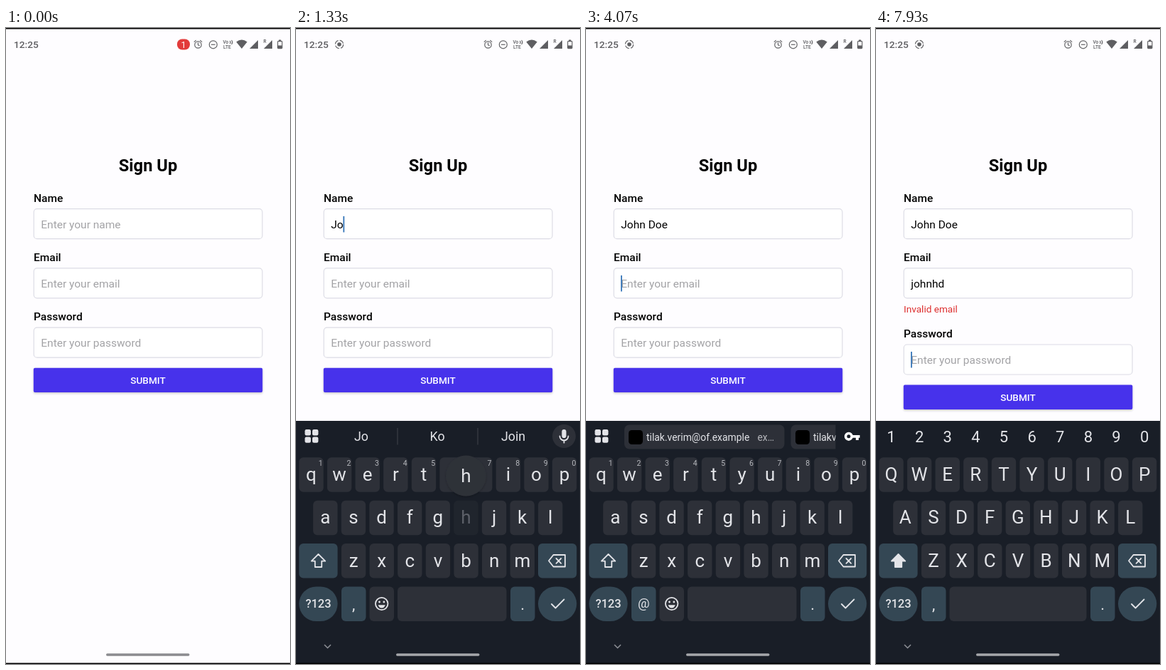
An HTML page for the animation above (8000 ms loop, 400x892 px).

```html
<!DOCTYPE html>
<html lang="en">
<head>
<meta charset="utf-8">
<title>Sign up form</title>
<style>
html, body { margin: 0; width: 100%; height: 100%; overflow: hidden; background: #fefdff; }
svg { display: block; width: 100vw; height: 100vh; font-family: Roboto, "Open Sans", sans-serif; }
text { white-space: pre; }
.mid { text-anchor: middle; }
.title { font-size: 23.7px; font-weight: 700; }
.label { font-size: 15.5px; font-weight: 500; }
.value { font-size: 15.5px; }
.hint { fill: #a3a3a6; }
.box { fill: #fff; stroke: #dcdce5; stroke-width: 1.2; }
.key { fill: #2d3038; }
.special { fill: #344754; }
.letter { font-size: 26px; fill: #e3e4e8; text-anchor: middle; }
.sup { font-size: 10.5px; fill: #b6b8bd; text-anchor: middle; }
.word { font-size: 17.8px; fill: #e3e4e8; text-anchor: middle; }
.chip { font-size: 13.9px; fill: #e3e4e8; }
.line { fill: none; stroke: #e3e4e8; stroke-width: 1.8; stroke-linecap: round; stroke-linejoin: round; }
.light { fill: #e3e4e8; }
.thin { fill: none; stroke: #626265; stroke-width: 1.2; }
.tiny { font-size: 6.6px; font-weight: 500; }
.held rect { fill: #20252d; }
.held .letter { fill: #5c6068; }
.pressed { fill: #454952; }
.off { display: none; }

#badge { transform-origin: 250px 23px; animation: badge 8s infinite; }
#rec { transform-origin: 61px 23px; animation: rec 8s infinite; }
#kb { animation: rise 8s infinite; }
#chevron { animation: chevron 8s infinite; }
#handle { animation: handle 8s infinite; }
@keyframes badge {
  0%, .87% { transform: scale(1); opacity: 1; }
  3.6%, 100% { transform: scale(0); opacity: 0; }
}
@keyframes rec {
  0%, 2.5% { transform: scale(.4); opacity: 0; }
  5%, 100% { transform: none; opacity: 1; }
}
@keyframes rise {
  0%, 4% { transform: translateY(341px); animation-timing-function: cubic-bezier(0, 0, .2, 1); }
  7.53%, 100% { transform: none; }
}
@keyframes chevron {
  0%, 5% { opacity: 0; }
  7%, 100% { opacity: 1; }
}
@keyframes handle {
  0%, 4% { fill: #8b8b8f; }
  4.6%, 7% { fill: #3a3e46; }
  10.5%, 100% { fill: #a5a7ab; }
}
</style>
</head>
<body>
<svg viewBox="0 0 400 892">
  <defs>
    <filter id="drop" x="-10%" y="-30%" width="120%" height="180%">
      <feDropShadow dx="0" dy="1.4" stdDeviation="1.5" flood-opacity=".22"/>
    </filter>
    <clipPath id="edge"><rect x="288" y="550" width="63.5" height="44"/></clipPath>
  </defs>
  <rect width="400" height="892" fill="#fefdff"/>

  <!-- status bar -->
  <text x="11" y="28" font-size="13.7" fill="#5e5e61" font-weight="500">12:25</text>
  <g id="rec">
    <circle class="thin" cx="61" cy="23" r="5.6" stroke-dasharray="6.6 2.2"/>
    <circle cx="61" cy="23" r="2.8" fill="#5e5e61"/>
  </g>
  <g id="badge">
    <rect x="241" y="15.5" width="18" height="15" rx="7" fill="#e23b3b"/>
    <text class="mid" x="250" y="27.5" font-size="12.5" fill="#fff">1</text>
  </g>
  <g fill="#5e5e61">
    <circle class="thin" cx="270.5" cy="23.5" r="4.7"/>
    <path class="thin" d="M270.5 20.5v3.2l2.2 1.4M264.8 19.6l3-2.5M276.2 19.6l-3-2.5"/>
    <circle class="thin" cx="291.8" cy="23.3" r="5.5"/>
    <path class="thin" d="M289 23.3h5.6"/>
    <text class="tiny" x="305.5" y="22">Vo</text>
    <path class="thin" d="M315.3 18q1.6 2 0 4M317.6 17q2.4 3 0 6"/>
    <text class="tiny" x="306" y="29">LTE</text>
    <path d="M324.3 19.6Q332 13.6 339.7 19.6L332 29z"/>
    <path d="M355 17v12h-12zM375 17v12h-12z"/>
    <text class="tiny" x="362.5" y="21">R</text>
    <rect class="thin" x="382.7" y="18.6" width="6.2" height="10" rx=".8"/>
    <path d="M384.2 16.6h3.2v2h-3.2zM382.7 24.5h6.2v4h-6.2z"/>
  </g>

  <!-- form -->
  <text class="title mid" x="200" y="201">Sign Up</text>
  <text class="label" x="39" y="244">Name</text>
  <rect class="box" x="39.2" y="253.7" width="321.8" height="42" rx="4.5"/>
  <text class="value" id="name" x="49.3" y="281"></text>
  <text class="label" x="39" y="327">Email</text>
  <rect class="box" x="39.2" y="336.8" width="321.8" height="42" rx="4.5"/>
  <text class="value" id="email" x="49.3" y="364"></text>
  <text id="error" x="39" y="398.5" font-size="13.6" fill="#dd2f2f">Invalid email</text>
  <g id="lower">
    <text class="label" x="39" y="410">Password</text>
    <rect class="box" x="39.2" y="420.2" width="321.8" height="42" rx="4.5"/>
    <text class="value" id="pass" x="49.3" y="447"></text>
    <rect x="38.8" y="476.7" width="322.5" height="34.4" rx="2" fill="#4630eb" filter="url(#drop)"/>
    <text class="mid" x="200" y="499" font-size="13.6" font-weight="500" fill="#fff">SUBMIT</text>
  </g>
  <rect id="caret" width="1.8" height="22.5" fill="#3474b8"/>

  <!-- keyboard -->
  <g id="kb">
    <rect y="551" width="400" height="700" fill="#191e27"/>
    <g id="grid" class="light">
      <rect x="12.5" y="563" width="8.4" height="8.4" rx="2.2"/><rect x="23" y="563" width="8.4" height="8.4" rx="2.2"/>
      <rect x="12.5" y="573.4" width="8.4" height="8.4" rx="2.2"/><rect x="23" y="573.4" width="8.4" height="8.4" rx="2.2"/>
    </g>
    <g id="tools">
      <text class="mid" x="93" y="577.5" font-size="14" font-weight="700" letter-spacing="1.2" fill="#5d6169">GIF</text>
      <circle cx="164.3" cy="572.5" r="5.5" fill="none" stroke="#e3e4e8" stroke-width="5"/>
      <circle cx="164.3" cy="572.5" r="8.4" fill="none" stroke="#e3e4e8" stroke-width="2.8" stroke-dasharray="4.4 4.4"/>
      <rect x="226" y="563" width="18.5" height="18.5" rx="2" fill="#d5d7db"/>
      <path class="light" d="M306.5 562.5a10 10 0 1 0 0 20c2.4 0 2.6-2 1.6-3.2c-1-1.6 0-2.8 1.6-2.8h2.6c2.6 0 4.4-2 4.4-4.8c0-5-4.6-9.2-10.2-9.2z"/>
      <g fill="#191e27"><circle cx="300.5" cy="572" r="1.6"/><circle cx="303.5" cy="567.5" r="1.6"/><circle cx="309" cy="567.5" r="1.6"/><circle cx="312.5" cy="572" r="1.6"/></g>
    </g>
    <g id="words">
      <path id="bars" d="M143 561v23.5M256 561v23.5" stroke="#3b3f47" stroke-width="1.2"/>
      <text class="word" x="92" y="579"></text>
      <text class="word" x="199" y="579"></text>
      <text class="word" x="306" y="579"></text>
    </g>
    <g id="chips">
      <rect class="key" x="54" y="556.5" width="225.5" height="34" rx="7"/>
      <rect x="60" y="564" width="20" height="20" rx="4.5"/>
      <text class="chip" x="85" y="579">tilak.verim@of.example</text>
      <text class="chip" x="241.5" y="579" opacity=".75">ex…</text>
      <g clip-path="url(#edge)">
        <rect class="key" x="288.5" y="556.5" width="90" height="34" rx="7"/>
        <rect x="295" y="564" width="20" height="20" rx="4.5"/>
        <text class="chip" x="320" y="579">tilakverim</text>
      </g>
    </g>
    <g id="nums"></g>
    <g id="mic">
      <circle class="key" cx="377.5" cy="572.5" r="16.5"/>
      <rect class="light" x="374.4" y="563" width="6.2" height="12" rx="3.1"/>
      <path class="line" d="M371.5 572.5a6 6 0 0 0 12 0M377.5 578.7v3"/>
    </g>
    <g id="lock">
      <circle cx="370" cy="572.8" r="4.3" fill="none" stroke="#fff" stroke-width="3.6"/>
      <path d="M374.5 571h11.2v3.7h-1.7v3.3h-4v-3.3h-5.5z" fill="#fff"/>
    </g>

    <g id="keys"></g>

    <rect class="special" x="4.3" y="723" width="54.3" height="48.5" rx="6"/>
    <path id="shift" class="line" d="M31.5 738l-9.7 9.7h5v8.3h9.4v-8.3h5z"/>
    <rect class="special" x="341" y="723" width="54.3" height="48.5" rx="6"/>
    <path class="line" d="M362.5 739h16.5v16.5h-16.5l-6.5-8.25zM366.5 744l6.8 6.8M373.3 744l-6.8 6.8"/>

    <rect class="special" x="4.3" y="783.5" width="54.3" height="48.5" rx="24.2"/>
    <text class="mid light" x="31.5" y="813" font-size="16.5" font-weight="500">?123</text>
    <rect class="special" x="64" y="783.5" width="34.5" height="48.5" rx="6"/>
    <text class="mid light" id="comma" x="81.2"></text>
    <g id="emoji">
      <rect class="key" x="103.5" y="783.5" width="34.5" height="48.5" rx="6"/>
      <circle class="line" cx="120.7" cy="807.5" r="8.7"/>
      <path class="light" d="M115.6 809.3h10.2q-1.5 4.2-5.1 4.2t-5.1-4.2z"/>
      <circle class="light" cx="117.5" cy="805" r="1.4"/><circle class="light" cx="123.9" cy="805" r="1.4"/>
    </g>
    <rect class="key" id="space" y="783.5" height="48.5" rx="6"/>
    <rect class="special" x="302" y="783.5" width="34.5" height="48.5" rx="6"/>
    <text class="mid light" x="319.2" y="816" font-size="22">.</text>
    <rect class="special" x="341" y="783.5" width="54.3" height="48.5" rx="24.2"/>
    <path class="line" d="M360 808l5.5 5.5l12-12"/>

    <g id="pop">
      <circle class="key" r="28.5" filter="url(#drop)"/>
      <text class="letter" y="9"></text>
    </g>
  </g>

  <!-- navigation bar -->
  <path id="chevron" d="M40 865l4.5 4.5l4.5-4.5" fill="none" stroke="#8d9096" stroke-width="1.5"/>
  <rect id="handle" x="141" y="877.3" width="117.5" height="3.4" rx="1.7"/>
  <path d="M0 0h400v1.4H0zM0 890.6h400v1.4H0z"/>
</svg>

<script>
const LOOP = 8000, PITCH = 39.62;
const $ = id => document.getElementById(id);
const show = (id, on) => $(id).classList.toggle('off', !on);

const rows = [
  { chars: 'qwertyuiop', x: 21.5, y: 626.5 },
  { chars: 'asdfghjkl', x: 41.3, y: 687 },
  { chars: 'zxcvbnm', x: 81.1, y: 747.3 }
];
const keys = {};

function buildKeys() {
  let html = '', nums = '';
  rows.forEach((row, r) => [...row.chars].forEach((char, i) => {
    const x = row.x + i * PITCH, digit = (i + 1) % 10;
    keys[char] = { x, y: row.y };
    html += `<g data-key="${char}"><rect class="key" x="${x - 17.2}" y="${row.y - 24.3}" width="34.4" height="48.5" rx="6"/>
      <text class="letter" x="${x}" y="${row.y + 8.2}"></text>`;
    if (!r) {
      html += `<text class="sup" x="${x + 13.3}" y="614">${digit}</text>`;
      nums += `<text class="letter" style="font-size:22px" x="${x}" y="580.5">${digit}</text>`;
    }
    html += '</g>';
  }));
  $('keys').innerHTML = html;
  $('nums').innerHTML = nums;
  document.querySelectorAll('[data-key]').forEach(el => keys[el.dataset.key].el = el);
}

const base = { name: '', email: '', focus: '', caret: true, caps: true, top: 'tools', words: ['', '', ''],
               press: '', at: false, error: false, secure: false };

// Each step changes part of the state from its time on
const steps = [
  [260, { focus: 'name' }],
  [930, { press: 'j' }],
  [1070, { press: '', name: 'J', caps: false, top: 'words', words: ['J', 'I', 'Just'] }],
  [1130, { press: 'o' }],
  [1270, { press: 'h', name: 'Jo', words: ['Jo', 'Ko', 'Join'] }],
  [1400, { press: '', name: 'Joh', words: ['Joh', 'John', 'Job'] }],
  [1470, { press: 'n' }],
  [1600, { press: '', name: 'John', words: ['John', 'Join', 'Johnny'] }],
  [1730, { press: ' ' }],
  [1800, { press: '', name: 'John ', words: ['is', 'and', 'has'] }],
  [2000, { caps: true }],
  [2270, { press: 'd' }],
  [2400, { press: '', name: 'John D', caps: false, words: ['D', 'Day', 'Did'] }],
  [2530, { press: 'o' }],
  [2670, { press: '', name: 'John Do', words: ['Do', "Don't", 'Done'] }],
  [2800, { press: 'e' }],
  [2930, { press: '', name: 'John Doe' }],
  [3000, { words: ['Doe', 'Does', 'Dow'] }],
  [3400, { caret: false }],
  [3730, { focus: 'email', caret: true }],
  [3870, { at: true, top: 'chips' }],
  [4130, { press: 'j' }],
  [4270, { press: 'o', email: 'j', top: 'words', words: ['', 'j', ''] }],
  [4400, { press: 'h', email: 'jo', words: ['', 'jo', ''] }],
  [4530, { press: '', email: 'joh', words: ['', 'joh', ''] }],
  [4670, { press: 'n' }],
  [4800, { press: '', email: 'john' }],
  [4930, { words: ['', 'john', ''] }],
  [5400, { caret: false }],
  [5930, { caret: true }],
  [6400, { caret: false }],
  [6930, { caret: true, press: 'h' }],
  [7070, { press: '', email: 'johnh', words: ['', 'johnh', ''] }],
  [7130, { press: 'd' }],
  [7270, { press: '', email: 'johnhd', words: ['', 'johnhd', ''] }],
  [7600, { focus: 'pass' }],
  [7670, { error: true }],
  [7800, { at: false, secure: true, caps: true, top: 'nums' }]
];

function setField(id, value) {
  const hints = { name: 'name', email: 'email', pass: 'password' };
  $(id).textContent = value || 'Enter your ' + hints[id];
  $(id).classList.toggle('hint', !value);
}

function placeCaret(s) {
  show('caret', s.focus && s.caret);
  if (!s.focus) return;
  const field = $(s.focus);
  const width = s[s.focus] ? field.getComputedTextLength() : 0;
  const drop = s.focus === 'pass' && s.error ? 24 : 0;
  $('caret').setAttribute('x', 49 + width);
  $('caret').setAttribute('y', +field.getAttribute('y') - 17 + drop);
}

function drawKeys(s) {
  const cased = char => s.caps ? char.toUpperCase() : char;
  for (const char in keys) {
    const { el } = keys[char];
    el.querySelector('.letter').textContent = cased(char);
    el.classList.toggle('held', s.press === char);
  }
  document.querySelectorAll('.sup').forEach(el => el.classList.toggle('off', s.secure));
  $('shift').style.fill = s.caps ? '#e3e4e8' : 'none';
  $('comma').textContent = s.at ? '@' : ',';
  $('comma').setAttribute('font-size', s.at ? 18.5 : 22);
  $('comma').setAttribute('y', s.at ? 813 : 816);
  $('space').classList.toggle('pressed', s.press === ' ');
  $('space').setAttribute('x', s.secure ? 103.5 : 143);
  $('space').setAttribute('width', s.secure ? 193 : 153.5);
  show('emoji', !s.secure);

  const key = keys[s.press];
  show('pop', key);
  if (key) {
    $('pop').setAttribute('transform', `translate(${key.x} ${key.y - 59})`);
    $('pop').querySelector('text').textContent = cased(s.press);
  }
}

function draw(s) {
  setField('name', s.name);
  setField('email', s.email);
  setField('pass', '');
  show('error', s.error);
  $('lower').setAttribute('transform', `translate(0 ${s.error ? 23.8 : 0})`);
  placeCaret(s);
  drawKeys(s);
  for (const id of ['tools', 'words', 'chips', 'nums']) show(id, s.top === id);
  show('grid', !s.secure);
  show('mic', !s.at && !s.secure);
  show('lock', s.at);
  show('bars', s.words[0]);
  document.querySelectorAll('.word').forEach((el, i) => el.textContent = s.words[i]);
}

let start, shown = -1;
function tick(now) {
  start ??= now;
  const t = (now - start) % LOOP;
  const past = steps.filter(([at]) => at <= t + 1);
  if (past.length !== shown) {
    shown = past.length;
    draw(Object.assign({}, base, ...past.map(([, change]) => change)));
  }
  requestAnimationFrame(tick);
}

buildKeys();
draw(base);
requestAnimationFrame(tick);
</script>
</body>
</html>
```
